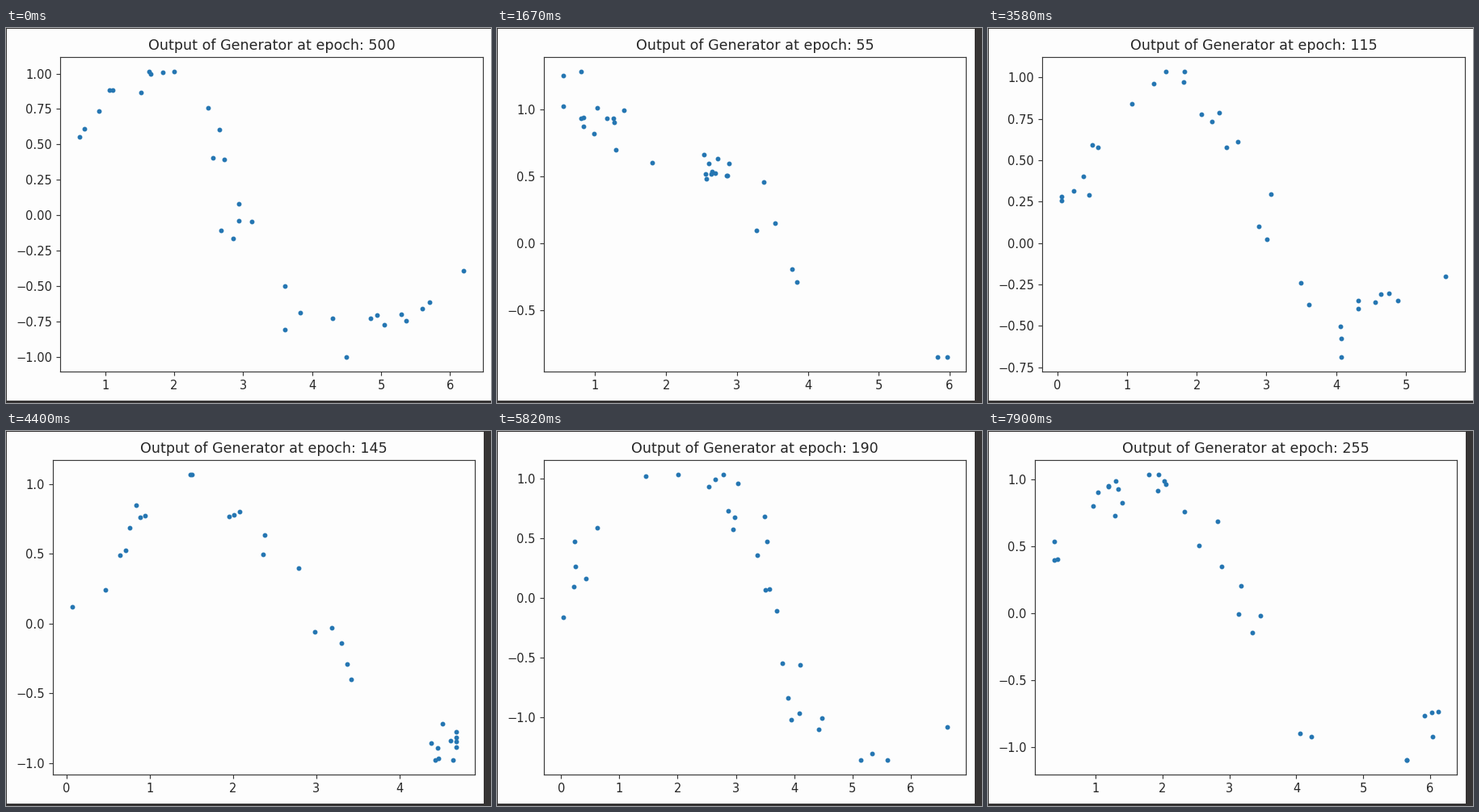
Recreate the animation shown at these times as a matplotlib script. Size 600 by 465 pixels, loop 7990 ms.

```python
import numpy as np
import matplotlib.pyplot as plt
from matplotlib.animation import FuncAnimation
from matplotlib.patches import Rectangle

W, H, DPI = 600, 465, 100
LOOP, FRAMES = 7990, 96
AX_W, AX_H, AX_BOTTOM = 522.5, 389.8, 39.2
K = AX_W / 496             # zoom of the default plot
LABEL_LEFT, PAD = 12.1, 10.5
DARK, PAPER, INK, LINE, BLUE = "#363434", "#fdfdfd", "#262626", "#383838", "#2576b2"

plt.rcParams.update({
    "font.family": "DejaVu Sans",
    "font.size": 10 * K,
    "text.color": INK,
    "axes.titlesize": 12 * K,
    "axes.titlepad": 6 * K,
    "axes.linewidth": 0.8 * K,
    "axes.edgecolor": LINE,
    "axes.facecolor": PAPER,
    "lines.markersize": 6 * K,
})
for axis in ("xtick", "ytick"):
    plt.rcParams.update({
        f"{axis}.color": LINE,
        f"{axis}.labelcolor": INK,
        f"{axis}.major.size": 3.5 * K,
        f"{axis}.major.width": 0.8 * K,
        f"{axis}.major.pad": 3.5 * K,
    })

# Shape of the learned curve at a few epochs, as key points along it
HOOK = [(.9, 1.716), (.74, 1.157), (.67, .955), (.85, .69),
        (.98, .454), (1.45, .336), (1.85, .45), (2.913, .616)]
SHAPES = {
    0: 0.25 * np.array(HOOK),
    30: HOOK,
    75: [(.888, .86), (1.11, .92), (1.523, 1.064), (2.64, .76),
         (3.2, .09), (4.53, .026), (5.56, -.75), (8, -1.558)],
    115: [(.064, .258), (.58, .58), (1.827, 1.037), (2.59, .61),
          (2.89, .1), (4.072, -.689), (4.32, -.35), (5.568, -.2)],
    145: [(.068, .118), (.89, .76), (1.488, 1.07), (2.08, .8),
          (2.79, .4), (3.42, -.4), (4.648, -.978), (4.682, -.816)],
    190: [(.035, -.162), (.62, .586), (1.45, 1.02), (2.784, 1.034),
          (3.5, .067), (3.89, -.84), (5.145, -1.357), (6.62, -1.077)],
    255: [(.378, .393), (.96, .8), (1.941, 1.035), (2.33, .756),
          (3.17, .2), (4.05, -.9), (5.647, -1.098), (6.118, -.735)],
    500: [(.631, .551), (1.11, .881), (2, 1.016), (2.73, .395),
          (3.6, -.5), (4.493, -1), (5.05, -.77), (6.196, -.389)],
}
EPOCHS = list(SHAPES)
KNOTS = np.array([SHAPES[e] for e in EPOCHS])
BATCH = 32

# Training pace: elapsed ms against logged steps of 5 epochs
PACE_MS = [80, 920, 2170, 3500, 4320, 5740, 7820]
PACE_STEP = [0, 6, 15, 23, 29, 38, 51]


def epoch_at(frame):
    if frame == 0:
        return 500
    ms = frame * LOOP / FRAMES
    return 5 * int(np.interp(ms, PACE_MS, PACE_STEP) + 1e-6)


def samples(epoch):
    """Random batch scattered along the curve blended for this epoch."""
    rng = np.random.default_rng(epoch)
    pos = np.interp(epoch, EPOCHS, range(len(EPOCHS)))
    i = min(int(pos), len(EPOCHS) - 2)
    mix = pos - i
    knots = (1 - mix) * KNOTS[i] + mix * KNOTS[i + 1]
    size = np.ptp(knots, axis=0)
    # Between the known shapes the curve itself wobbles
    knots = knots + rng.normal(0, 0.4, knots.shape) * size * mix * (1 - mix)

    grid = np.arange(len(knots))
    u = rng.uniform(0, grid[-1], BATCH - len(knots))
    points = np.column_stack([np.interp(u, grid, axis) for axis in knots.T])
    points += rng.normal(0, 0.03, points.shape) * size
    points = np.clip(points, knots.min(axis=0), knots.max(axis=0))
    return np.vstack([knots, points])


fig = plt.figure(figsize=(W / DPI, H / DPI), dpi=DPI, facecolor=DARK)
page = fig.add_artist(Rectangle((1, 3), W, H - 4, transform=None,
                                facecolor=PAPER, linewidth=0, zorder=-1))
ax = fig.add_axes([0, 0, 1, 1])


def place(left):
    ax.set_position([left / W, AX_BOTTOM / H, AX_W / W, AX_H / H])


def draw(frame):
    epoch = epoch_at(frame)
    x, y = samples(epoch).T
    ax.clear()
    place(60)
    ax.plot(x, y, ".", color=BLUE, markeredgewidth=K)
    ax.set_title(f"Output of Generator at epoch: {epoch}")
    # Crop tightly around the tick labels, as a notebook does
    box = ax.get_tightbbox()
    shift = LABEL_LEFT - box.x0
    place(60 + shift)
    page.set_width(box.x1 + shift + PAD - 1)
    return []


anim = FuncAnimation(fig, draw, frames=FRAMES, interval=LOOP / FRAMES,
                     init_func=lambda: [], repeat=True, repeat_delay=0)
plt.show()
```
